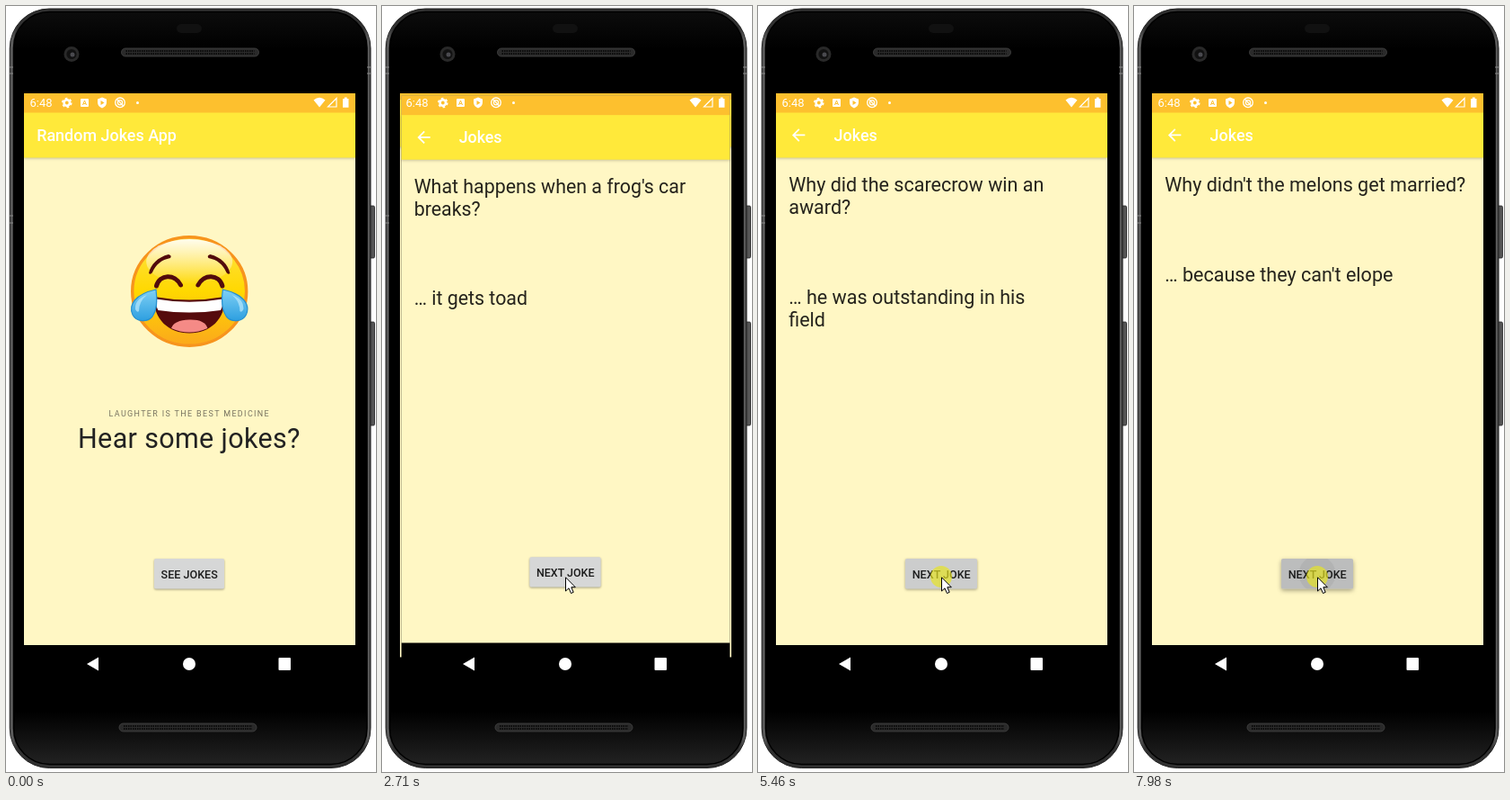
Animation, 412 px wide and 851 px high, one loop 8000 ms. Source, as an HTML page:

```html
<!DOCTYPE html>
<html lang="en">
<head>
<meta charset="utf-8">
<title>Random Jokes App</title>
<style>
  html, body { margin: 0; width: 100%; height: 100%; overflow: hidden; background: #fff; }
  svg { display: block; }
  text { font-family: Roboto, sans-serif; white-space: pre; }
  .bar { font-size: 17.96px; font-weight: 500; fill: #fff; }
  .joke { font-size: 21.55px; fill: #25231c; }
  .label { font-size: 12.57px; font-weight: 500; fill: #1c1c1c; text-anchor: middle; }
</style>
</head>
<body>
<svg id="stage" width="412" height="851" viewBox="0 0 412 851"></svg>
<script>
const LOOP = 8000;
const CENTER = { x: 204.5, y: 425 };
const TOUCH = { x: 204, y: 634 };
const OPEN_AT = 2522;

const JOKES = [
  [["What happens when a frog's car", "breaks?"], ["… it gets toad"]],
  [["What do you get when you put a", "vest on an alligator?"], ["… an investigator"]],
  [["Why did the scarecrow win an", "award?"], ["… he was outstanding in his", "field"]],
  [["Did you hear about the two", "antennas that got married?"], ["… the ceremony was okay, but, the", "reception was great!"]],
  [["Why did the bicycle fall over on", "the hill?"], ["… because it was simply two tired"]],
  [["What do you call cheese that is", "not yours?"], ["… nacho cheese"]],
  [["What does a nosy pepper do?"], ["… it gets jalapeno business"]],
  [["Why didn't the melons get married?"], ["… because they can't elope"]],
];

// Pointer down, ripple start, pointer up. The first click opens the jokes screen.
const CLICKS = [
  [1560, 1710, 1740], [3510, 3550, 3590], [4570, 4620, 4660], [5380, 5430, 5470],
  [6390, 6440, 6480], [6760, 6830, 6860], [7100, 7170, 7200], [7470, 7540, 7570],
  [7840, 7900, 8100],
].map(([down, ripple, up]) => ({ down, ripple, up }));

const clamp = v => Math.max(0, Math.min(1, v));
const rect = (x, y, w, h, fill, extra = "") =>
  `<rect x="${x}" y="${y}" width="${w}" height="${h}" fill="${fill}" ${extra}/>`;

const button = (x, w, label) => `
  <g class="button">
    ${rect(x, 614, w, 33.5, "#d6d7d7", 'rx="1.8" class="face"')}
    <svg x="${x}" y="614" width="${w}" height="33.5" viewBox="${x} 614 ${w} 33.5">
      ${rect(x, 614, w, 33.5, "#000", 'rx="1.8" class="tint"')}
      <circle cx="${TOUCH.x}" cy="631" class="ripple"/>
    </svg>
    <text class="label" x="204.2" y="635.5">${label}</text>
  </g>`;

const appWindow = (id, content) => `
  <g id="${id}">
    ${rect(20, 97, 369, 656, "#000")}
    ${rect(20, 97, 369, 613, "#fff7c4")}
    <g style="filter:drop-shadow(0 1.5px 1.5px rgba(0,0,0,.22))">${rect(20, 118, 369, 50.5, "#ffe93a")}</g>
    ${rect(20, 97, 369, 21.5, "#fdc02e")}
    ${content}
  </g>`;

const mirrored = shape => shape + `<g transform="translate(408.4) scale(-1 1)">${shape}</g>`;

const emoji = `
  <ellipse cx="204.2" cy="317" rx="63.5" ry="60.3" fill="url(#skin)" stroke="#f7941d" stroke-width="3.4"/>
  <ellipse cx="204.2" cy="284" rx="48" ry="25" fill="url(#shine)"/>
  ${mirrored(`
    <path d="M159 297C161 287 169 279 181 276Q185 277 183 280C173 282 167 287 163 296Q161 299 159 297Z" fill="#520b0c"/>
    <path d="M167.500 311C171 298 188 297 194.500 310" fill="none" stroke="#520b0c" stroke-width="5" stroke-linecap="round"/>`)}
  <path d="M165 323Q204 330 243.400 323C245 348 227 363.500 204.200 363.500S163.500 348 165 323Z" fill="#560b0d"/>
  <path d="M167 325.500Q204 332 241.400 325.500Q242 333 239 338Q204 343 169.400 338Q166.500 333 167 325.500Z" fill="#fff"/>
  <path d="M184 358Q187 349 204.200 348.500T224.400 358Q204 367 184 358Z" fill="#f58a86"/>
  ${mirrored(`
    <path d="M167 315C169 329 168 338 163 345C157 352 145 351 141 343C136 332 144 320 167 315Z" fill="url(#tear)" stroke="#2590cf" stroke-width="1.2"/>
    <path d="M144 337Q143 326 157 321Q148 328 148 339Q146 341 144 337Z" fill="#b4e5fb" opacity=".75"/>`)}`;

const grille = (x, y) => `
  ${rect(x, y, 153, 9, "#2a2a2a", 'rx="4.5" stroke="#454545" stroke-width=".8"')}
  <path d="M${x + 5} ${y + 3}h143m-143 3h143" stroke="#0b0b0b" stroke-width="2" stroke-dasharray="1.500 1"/>`;

const phone = `
  ${rect(402, 222, 8.5, 58, "#555", 'rx="1.5" stroke="#222" stroke-width=".8"')}
  ${rect(402, 351, 8.5, 115, "#555", 'rx="1.5" stroke="#222" stroke-width=".8"')}
  ${rect(4.2, 3, 401.8, 843.5, "url(#metal)", 'rx="44" stroke="#222" stroke-width="1"')}
  ${rect(8.5, 6.5, 393.5, 836, "url(#glass)", 'rx="40" stroke="#000" stroke-width="1.5"')}
  <path d="M4 68h4m-4 7h4M402 68h4m-4 7h4M4 233h4m-4 8h4" stroke="#8a8a8a"/>
  ${grille(128.5, 47)}${grille(126, 797)}
  ${rect(190, 20, 28, 10, "#111", 'rx="5"')}
  <circle cx="73" cy="53.500" r="8.500" fill="#292929"/>
  <circle cx="73" cy="53.500" r="5.500" fill="#111"/>
  <circle cx="74" cy="54" r="2.500" fill="#4a4a4f"/>`;

const statusBar = `
  <g fill="#fff">
    <text x="26.500" y="112" font-size="13">6:48</text>
    <circle cx="67.800" cy="107.500" r="3.200" fill="none" stroke="#fff" stroke-width="2.600"/>
    <circle cx="67.800" cy="107.500" r="5" fill="none" stroke="#fff" stroke-width="1.600" stroke-dasharray="2.600 2.636"/>
    ${rect(83, 103, 9, 9, "#fff", 'rx="1"')}
    <path d="M85.500 110L87.500 105L89.500 110M86.300 108.500h2.400" fill="none" stroke="#fdc02e" stroke-width="1"/>
    <path d="M107 101.500L112 103.500V107Q112 111.500 107 113.500Q102 111.500 102 107V103.500Z"/>
    <path d="M105.500 105L109.500 107.500L105.500 110Z" fill="#fdc02e"/>
    <circle cx="127" cy="107.300" r="5.300" fill="none" stroke="#fff" stroke-width="1.300"/>
    <circle cx="127" cy="107.300" r="2.600" fill="none" stroke="#fff" stroke-width="1.200"/>
    <path d="M124 104L131 111.500" stroke="#fff" stroke-width="1.200"/>
    <circle cx="146.500" cy="107.500" r="1.500"/>
    <path d="M342.500 104.500Q349 99 355.500 104.500L349 112.500Z"/>
    <path d="M358.500 112L368 102.500V112Z" fill="none" stroke="#fff" stroke-width="1.200"/>
    <path d="M375 103h1.800v-1.400h2.900V103h1.800v9.700H375Z"/>
  </g>`;

document.getElementById("stage").innerHTML = `
  <defs>
    <linearGradient id="metal"><stop stop-color="#3d3d3d"/><stop offset=".006" stop-color="#606060"/>
      <stop offset=".02" stop-color="#303030"/><stop offset=".98" stop-color="#303030"/>
      <stop offset=".994" stop-color="#606060"/><stop offset="1" stop-color="#333"/></linearGradient>
    <linearGradient id="glass" x2="0" y2="1"><stop stop-color="#0c0c0c"/><stop offset=".05"/>
      <stop offset=".93"/><stop offset="1" stop-color="#222"/></linearGradient>
    <linearGradient id="skin" x2="0" y2="1"><stop stop-color="#ffe34a"/><stop offset=".5" stop-color="#ffd800"/>
      <stop offset="1" stop-color="#fba81c"/></linearGradient>
    <linearGradient id="shine" x2="0" y2="1"><stop stop-color="#fff" stop-opacity=".9"/>
      <stop offset="1" stop-color="#fff" stop-opacity="0"/></linearGradient>
    <linearGradient id="tear" x2="0" y2="1"><stop stop-color="#7fd0f5"/><stop offset="1" stop-color="#2d9fe0"/></linearGradient>
    <clipPath id="screen">${rect(20, 97, 369, 656, "#000")}</clipPath>
  </defs>
  ${phone}
  <g clip-path="url(#screen)">
    ${appWindow("home", `
      <text class="bar" x="34.200" y="150">Random Jokes App</text>
      ${emoji}
      <text x="114.500" y="456" font-size="8.980" letter-spacing="1.350" fill="#777360">LAUGHTER IS THE BEST MEDICINE</text>
      <text x="80" y="491" font-size="30.500" letter-spacing=".350" fill="#222">Hear some jokes?</text>
      ${button(165, 78, "SEE JOKES")}`)}
    ${appWindow("jokes", `
      <path transform="translate(34.400 132.700) scale(.898)" fill="#fff"
        d="M20 11H7.830l5.590-5.590L12 4l-8 8 8 8 1.410-1.410L7.830 13H20Z"/>
      <text class="bar" x="84.600" y="150">Jokes</text>
      <g id="joke"></g>
      ${button(164, 80, "NEXT JOKE")}`)}
  </g>
  ${statusBar}
  <g fill="#fff"><path d="M90 731L103 723.500V738.500Z"/><circle cx="204" cy="731" r="7"/>${rect(303.5, 724, 13.5, 14, "#fff", 'rx="1"')}</g>
  <circle id="halo" cx="${TOUCH.x}" cy="${TOUCH.y}" r="12" fill="#e8e420" opacity=".68"/>
  <path id="cursor" d="M.500 .800V16L4 12.800L6.500 18.500L9.200 17.300L6.800 11.700H11.300Z" fill="#fff" stroke="#000"/>`;

const [home, jokes, joke, halo, cursor] =
  ["home", "jokes", "joke", "halo", "cursor"].map(id => document.getElementById(id));
const show = (el, on) => { el.style.display = on ? "" : "none"; };

// One cubic piece [x1, y1, x2, y2] between two points, solved for y at x.
function bezierY(x, [x0, y0], [x1, y1, x2, y2], [x3, y3]) {
  const at = (a, b, c, d, s) =>
    a * (1 - s) ** 3 + 3 * b * s * (1 - s) ** 2 + 3 * c * s * s * (1 - s) + d * s ** 3;
  let lo = 0, hi = 1;
  for (let i = 0; i < 24; i++) {
    const mid = (lo + hi) / 2;
    if (at(x0, x1, x2, x3, mid) < x) lo = mid; else hi = mid;
  }
  return at(y0, y1, y2, y3, lo);
}

// Fast out, extra slow in.
const openEase = p => p < 1 / 6
  ? bezierY(p, [0, 0], [.05, 0, .1333, .06], [1 / 6, .4])
  : bezierY(p, [1 / 6, .4], [.2083, .82, .25, 1], [1, 1]);

function scaleWindow(el, s) {
  el.setAttribute("transform",
    `translate(${CENTER.x} ${CENTER.y}) scale(${s}) translate(${-CENTER.x} ${-CENTER.y})`);
}

let shownJoke = -1;
function showJoke(index) {
  if (index === shownJoke) return;
  shownJoke = index;
  const [question, answer] = JOKES[index];
  const lines = (list, y) => list.map((line, i) =>
    `<text class="joke" x="34.2" y="${y + 25 * i}">${line}</text>`).join("");
  joke.innerHTML = lines(question, 206) + lines(answer, 281 + 25 * question.length);
}

function drawButton(screen, t) {
  const click = CLICKS.filter(c => c.ripple <= t).pop();
  const age = click ? t - click.ripple : 1e4;
  const pressed = clamp(age / 80) * clamp((300 - age) / 140);
  const part = name => screen.querySelector("." + name);
  part("face").style.filter =
    `drop-shadow(0 ${1 + 1.5 * pressed}px ${1 + 1.5 * pressed}px rgba(0,0,0,.35))`;
  part("tint").setAttribute("opacity", .12 * pressed);
  part("ripple").setAttribute("r", 48 * clamp(age / 190));
  part("ripple").setAttribute("opacity", .05 * pressed);
}

function drawCursor(t) {
  const p = 1 - (1 - clamp((t - 560) / 710)) ** 2;
  const curve = (a, b, c) => a * (1 - p) ** 2 + 2 * b * p * (1 - p) + c * p * p;
  const x = t < 1380 ? curve(285, 165, 205) : TOUCH.x;
  const y = t < 1380 ? curve(852, 700, 635) : TOUCH.y;
  cursor.setAttribute("transform", `translate(${x} ${y})`);
  show(cursor, t >= 570);
}

function draw(t) {
  const opening = clamp((t - OPEN_AT) / 400);
  const eased = opening === 1 ? 1 : openEase(opening);
  scaleWindow(home, 1 + .05 * eased);
  scaleWindow(jokes, .85 + .15 * eased);
  jokes.setAttribute("opacity", clamp((t - OPEN_AT - 50) / 50));
  show(home, opening < 1);
  show(jokes, opening > 0);

  const clicksDone = CLICKS.filter(c => c.up <= t).length;
  showJoke(Math.max(0, clicksDone - 1));
  drawButton(t < OPEN_AT ? home : jokes, t);
  show(halo, CLICKS.some(c => t >= c.down && t < c.up));
  drawCursor(t);
}

const start = performance.now();
function tick() {
  draw((performance.now() - start) % LOOP);
  requestAnimationFrame(tick);
}
tick();
</script>
</body>
</html>
```
